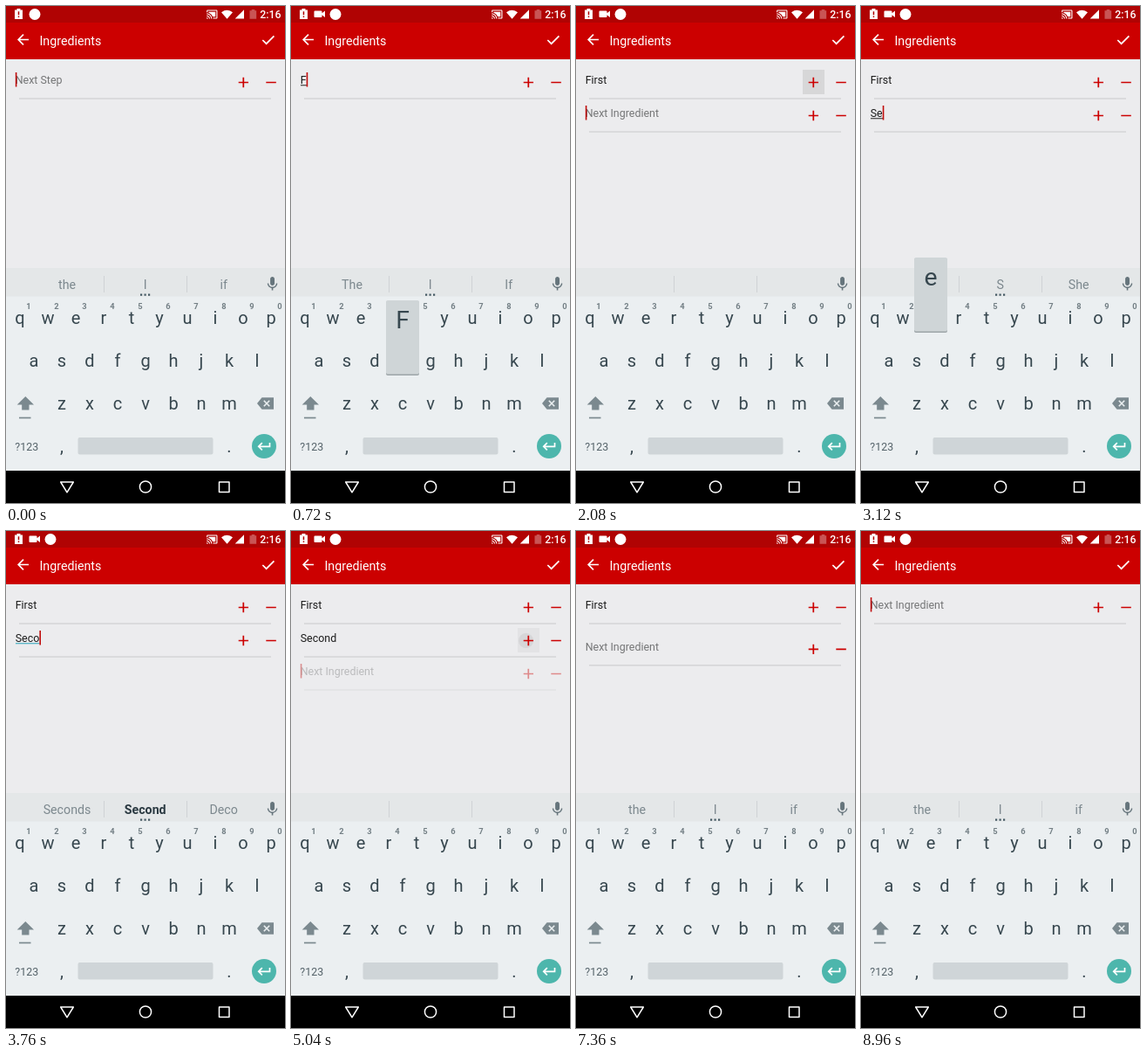
An HTML page for the animation above (9.04 s loop, 320 px wide and 569 px high).

```html
<!DOCTYPE html>
<html lang="en">
<head>
<meta charset="utf-8">
<title>Ingredients</title>
<style>
html, body { margin: 0; width: 100%; height: 100%; overflow: hidden; background: #000; }
svg { display: block; width: 100vw; height: 100vh; font-family: Roboto, "Noto Sans", sans-serif; }
.mid { text-anchor: middle; }
.key { font-size: 20px; fill: #37474f; }
.hint { font-size: 9.3px; font-weight: 700; fill: #737f85; }
.word { font-size: 14.22px; }
.row text { font-size: 12.44px; }
</style>
</head>
<body>
<svg id="stage" viewBox="0 0 320 569" xmlns="http://www.w3.org/2000/svg">
  <rect width="320" height="569" fill="#ececee"/>
  <rect width="320" height="61" fill="#cc0000"/>
  <rect width="320" height="19" fill="#b00303"/>

  <g id="status" fill="#fff">
    <path d="M10 4.5H12.5V3H16.5V4.5H19V15H10Z"/>
    <path d="M14.5 6.3V10.3M14.5 11.5V13" stroke="#b00303" stroke-width="1.5"/>
    <path id="video" d="M27.5 5.5H34.5Q35.5 5.5 35.5 6.5V8.3L39 5.5V13L35.5 10.3V12Q35.5 13 34.5 13H27.5Q26.5 13 26.5 12V6.5Q26.5 5.5 27.5 5.5Z"/>
    <circle id="app" cy="9.5" r="6.5"/>
    <path transform="translate(229.6 2.8) scale(.56)" d="M21 3H3c-1.1 0-2 .9-2 2v3h2V5h18v14h-7v2h7c1.1 0 2-.9 2-2V5c0-1.1-.9-2-2-2zM1 18v3h3c0-1.66-1.34-3-3-3zm0-4v2c2.76 0 5 2.24 5 5h2c0-3.87-3.13-7-7-7zm0-4v2c4.97 0 9 4.03 9 9h2c0-6.08-4.93-11-11-11zM19 7H5v1.63c3.96 1.28 7.09 4.41 8.37 8.37H19V7z"/>
    <path d="M247 7.2Q253.5 2.4 260 7.2L253.5 14.8Z"/>
    <path d="M273 4.2V14.5H262.7Z"/>
    <path d="M279.5 5.2H281.7V4H285.3V5.2H287.2V14.8H279.5Z" opacity=".32"/>
    <text x="291.3" y="13.7" font-size="12.3" font-weight="500">2:16</text>
  </g>

  <g fill="none" stroke="#fff" stroke-width="1.7">
    <path d="M26 38.5H14.4M20 32.7L14.2 38.5L20 44.3"/>
    <path d="M294.3 39L298.6 43.2L307.4 34.3"/>
  </g>
  <text x="38.5" y="45.3" font-size="14.22" fill="#fff">Ingredients</text>

  <g id="rows"></g>

  <rect y="300" width="320" height="33" fill="#e4e7e8"/>
  <rect y="332.5" width="320" height="199.5" fill="#ebeff1"/>
  <path d="M112.5 309V328M207.5 309V328" stroke="#cfd3d5"/>
  <g id="words"></g>
  <path id="dots" d="M154 329.5h2.2v2.2h-2.2zM158.5 329.5h2.2v2.2h-2.2zM163 329.5h2.2v2.2h-2.2z" fill="#455a64"/>
  <path transform="translate(295.7 308.4) scale(.82)" fill="#66757c" d="M12 14c1.66 0 3-1.34 3-3V5c0-1.66-1.34-3-3-3S9 3.34 9 5v6c0 1.66 1.34 3 3 3zm5.3-3c0 3-2.54 5.1-5.3 5.1S6.7 14 6.7 11H5c0 3.41 2.72 6.23 6 6.72V21h2v-3.28c3.28-.48 6-3.3 6-6.72h-1.7z"/>

  <g id="keys"></g>
  <path id="shift" d="M22.3 447L32 456.5H26.5V462.5H18.2V456.5H12.7Z"/>
  <path d="M15 471.5H28.5" stroke="#7b898f" stroke-width="1.7"/>
  <path d="M293.5 448.3H307V461.7H293.5L288 455Z" fill="#7b898f"/>
  <path d="M295.8 451.8L302.2 458.2M302.2 451.8L295.8 458.2" stroke="#ebeff1" stroke-width="1.6"/>
  <text class="mid" x="23.8" y="508.5" font-size="12.44" fill="#546269">?123</text>
  <text class="mid key" x="64" y="511">,</text>
  <text class="mid key" x="256" y="511">.</text>
  <rect x="82.5" y="494" width="155" height="19.5" rx="2" fill="#cfd5d8"/>
  <circle cx="296" cy="504" r="14" fill="#4db6ac"/>
  <path d="M302.5 500V504.3H289.8M293.8 500.2L289.7 504.3L293.8 508.4" fill="none" stroke="#fff" stroke-width="1.7"/>

  <g id="pop">
    <rect x="-19" y="1" width="38" height="85" rx="2" fill="#9da5a8"/>
    <rect x="-19" width="38" height="84.5" rx="2" fill="#cfd5d7"/>
    <text class="mid" y="32" font-size="28.4" fill="#37474f"></text>
  </g>

  <rect y="532" width="320" height="37" fill="#000"/>
  <g fill="none" stroke="#fff" stroke-width="1.5" stroke-linejoin="round">
    <path d="M62.7 545H77.3L70 556.8Z"/>
    <circle cx="160" cy="550.5" r="6.6"/>
    <rect x="244.5" y="545" width="11.5" height="11.5"/>
  </g>
</svg>
<script>
const LOOP = 9040, STEP = 80, TEAL = '#3aa9bd';
const $ = id => document.getElementById(id);
const set = (el, attrs) => { for (const k in attrs) el.setAttribute(k, attrs[k]); };
const show = (el, on) => el.setAttribute('visibility', on ? 'visible' : 'hidden');
const make = (tag, parent, attrs, text = '') => {
  const el = document.createElementNS('http://www.w3.org/2000/svg', tag);
  set(el, attrs);
  el.textContent = text;
  parent.append(el);
  return el;
};
const ramp = (t, a, b) => Math.min(1, Math.max(0, (t - a) / (b - a)));
const ease = (t, a, b) => 0.5 - 0.5 * Math.cos(Math.PI * ramp(t, a, b));
const within = (t, a, b) => t >= a && t < b;
const latest = (steps, t) => steps.filter(s => s[0] <= t).pop();

// Keyboard
const layout = [['qwertyuiop', 16, 364], ['asdfghjkl', 32, 413], ['zxcvbnm', 64, 462]];
const keys = {};
layout.forEach(([letters, x0, y]) => [...letters].forEach((c, i) => {
  const x = x0 + 32 * i;
  keys[c] = { x, y, el: make('text', $('keys'), { class: 'mid key', x, y }, c) };
}));
for (let i = 0; i < 10; i++)
  make('text', $('keys'), { class: 'mid hint', x: 26 + 32 * i, y: 347 }, (i + 1) % 10);

// Key presses: start, end, letter
const presses = [
  [640, 860, 'F'], [880, 1000, 'i'], [1040, 1180, 'r'], [1200, 1340, 's'], [1380, 1510, 't'],
  [2960, 3110, 'S'], [3120, 3270, 'e'], [3360, 3500, 'c'], [3520, 3660, 'o'],
  [3840, 3980, 'n'], [4160, 4300, 'd']
];
const typed = (t, from, to) =>
  presses.filter(p => p[0] >= from && p[0] < to && p[0] <= t).map(p => p[2]).join('');

// Suggestions: time, left, middle, right, middle is bold
const suggestions = [
  [0, 'the', 'I', 'if'], [320, 'The', 'I', 'If'],
  [800, 'For', 'F', 'From'], [960, 'Fir', 'Fi', 'Five'], [1120, 'For', 'Fir', 'First'],
  [1280, 'Firs', 'First', 'Fits', 1], [1520, 'Firsts', 'First', 'Fist', 1],
  [2000, '', '', ''], [2240, 'the', 'I', 'if'], [2720, 'The', 'I', 'If'],
  [3040, 'So', 'S', 'She'], [3200, 'See', 'Se', 'Set'], [3440, 'Sex', 'Sec', 'Second'],
  [3600, 'Seconds', 'Second', 'Deco', 1], [3920, 'Seconds', 'Second', 'Decon', 1],
  [4320, 'Seconds', 'Second', 'Secondly', 1],
  [4960, '', '', ''], [5200, 'the', 'I', 'if']
];
const words = [70, 159.7, 249.7].map(x => make('text', $('words'), { class: 'mid word', x, y: 324 }));

// List rows
function makeRow(hint, id) {
  const g = make('g', $('rows'), { class: 'row' });
  const clips = [260, 292].map((x, i) => {
    const clip = make('clipPath', g, { id: `clip${id}${i}` });
    make('rect', clip, { x, y: 73, width: 25, height: 28 });
    return `url(#clip${id}${i})`;
  });
  const glow = make('rect', g, { y: 73, width: 25, height: 28 });
  const wave = make('circle', make('g', g, {}), {});
  make('path', g, { d: 'M15 106H304', stroke: '#c8c9ca' });
  make('path', g, { d: 'M266.7 87.5H278M272.3 81.8V93.2M298.3 87.5H309.8', stroke: '#cc0000', 'stroke-width': 1.7 });
  return {
    g, hint, clips, glow, wave,
    label: make('text', g, { x: 10.7, y: 89.2 }),
    line: make('rect', g, { x: 11, y: 90.2, height: 1.1 }),
    caret: make('rect', g, { y: 76, width: 1.6, height: 16.5, fill: '#c00c0c' })
  };
}
const rows = [makeRow('Next Step', 'a'), makeRow('Next Ingredient', 'b'), makeRow('Next Ingredient', 'c')];

function ripple(row, t, taps) {
  const tap = taps.find(p => within(t, p[0], p[0] + 640));
  show(row.glow, tap);
  show(row.wave, tap);
  if (!tap) return;
  const [start, side] = tap, age = t - start, fade = 1 - ramp(age, 300, 640);
  set(row.glow, { x: side ? 292 : 260, 'fill-opacity': 0.04 * ramp(age, 0, 120) * fade });
  row.wave.parentNode.setAttribute('clip-path', row.clips[side]);
  set(row.wave, {
    cx: side ? 303 : 269.5, cy: 87.5,
    r: 3 + 19 * ramp(age, 0, 240) ** 3, 'fill-opacity': 0.055 * fade
  });
}

function drawRow(row, t, s) {
  show(row.g, s.alpha > 0);
  show(row.line, s.compose && s.text && s.alpha > 0);
  show(row.caret, s.caret && s.alpha > 0);
  set(row.g, { transform: `translate(0 ${s.y})`, opacity: s.alpha });
  row.label.textContent = s.text || row.hint;
  row.label.setAttribute('fill', s.text ? '#1c1c1c' : '#757677');
  const width = s.text ? row.label.getComputedTextLength() : 0;
  set(row.line, { width, fill: s.teal ? TEAL : '#333' });
  row.caret.setAttribute('x', 10.8 + width);
  if (s.alpha > 0) ripple(row, t, s.taps);
  else { show(row.glow, false); show(row.wave, false); }
}

function draw(t) {
  const video = t >= 160;
  show($('video'), video);
  $('app').setAttribute('cx', video ? 51 : 33);

  const shifted = within(t, 320, 640) || within(t, 2720, 2960);
  $('shift').setAttribute('fill', shifted ? '#4db6ac' : '#7b898f');
  for (const c in keys) keys[c].el.textContent = shifted ? c.toUpperCase() : c;

  const press = presses.find(p => within(t, p[0], p[1]));
  show($('pop'), press);
  if (press) {
    const key = keys[press[2].toLowerCase()];
    $('pop').setAttribute('transform', `translate(${key.x} ${key.y - 76})`);
    $('pop').lastElementChild.textContent = press[2];
  }

  const [, left, middle, right, bold] = latest(suggestions, t);
  [left, middle, right].forEach((w, i) => {
    words[i].textContent = w;
    const strong = bold && i === 1;
    set(words[i], { fill: strong ? '#2b3a42' : '#7c888e', 'font-weight': strong ? 700 : 400 });
  });
  show($('dots'), middle);

  drawRow(rows[0], t, {
    text: typed(t, 0, 2000), y: 0, alpha: 1 - ramp(t, 8530, 8640),
    caret: t < 1840, compose: t < 1840, teal: bold, taps: [[1840, 0], [8500, 1]]
  });
  drawRow(rows[1], t, {
    text: typed(t, 2000, 5000), y: 38, alpha: ramp(t, 2000, 2080) * (1 - ramp(t, 7125, 7205)),
    caret: t < 4880, compose: t < 4880, teal: bold, taps: [[4880, 0], [7040, 1]]
  });
  drawRow(rows[2], t, {
    text: '', y: 76 - 38 * ease(t, 7195, 7445) - 38 * ease(t, 8640, 8890), alpha: ramp(t, 4990, 5110),
    caret: t < 5680 || within(t, 6080, 6480) || t >= 8720, taps: []
  });
}

const start = performance.now();
function tick() {
  const t = (performance.now() - start) % LOOP;
  draw(Math.floor(t / STEP) * STEP);
  requestAnimationFrame(tick);
}
tick();
</script>
</body>
</html>
```
